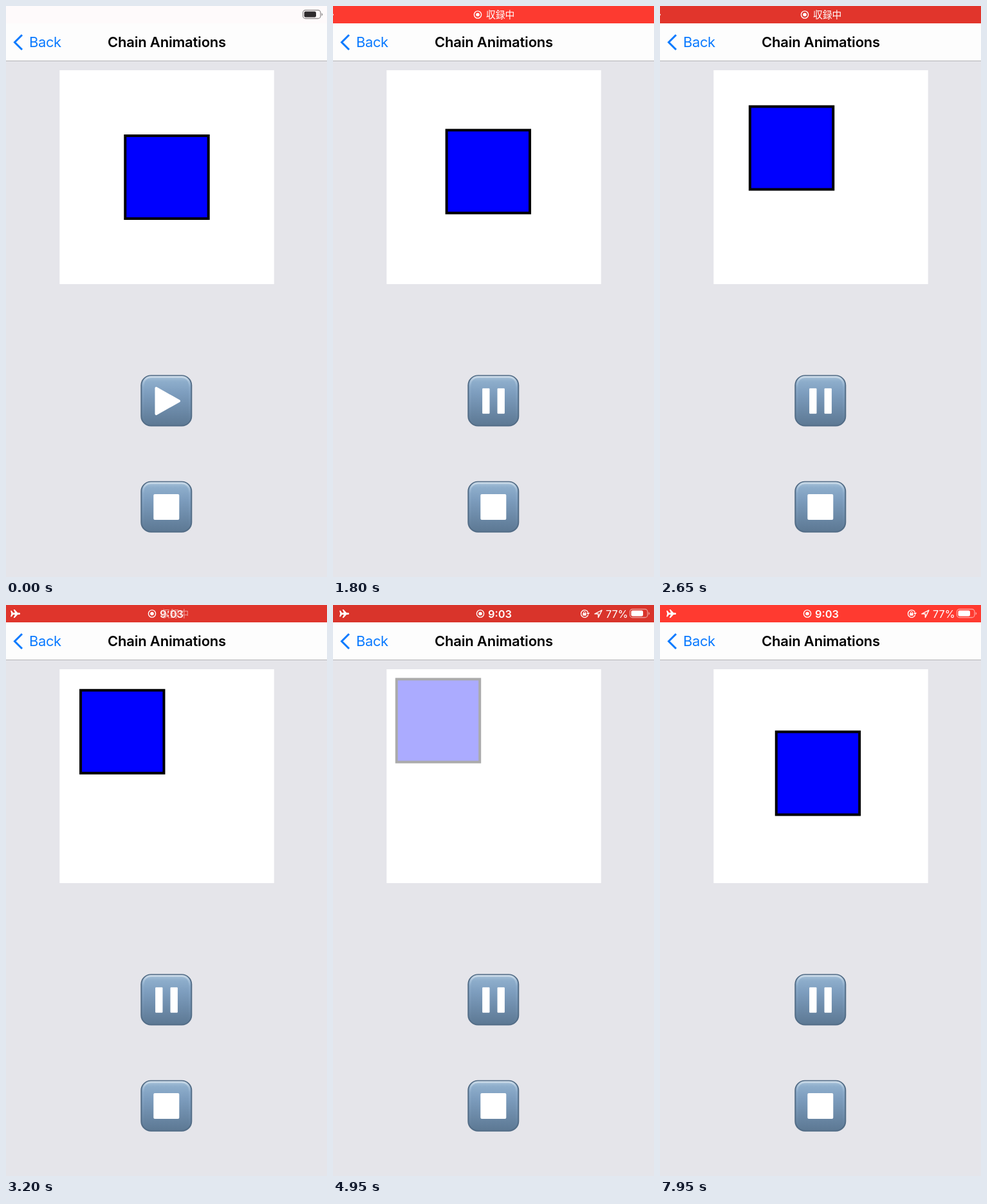
An HTML page for the animation above (8000 ms loop, 499x889 px).

```html
<!DOCTYPE html>
<html lang="en">
<head>
<meta charset="utf-8">
<title>Chain Animations</title>
<style>
  html, body { margin: 0; width: 100%; height: 100%; overflow: hidden; background: #e5e5ea; }
  svg { display: block; width: 499px; height: 889px; font-family: Inter, Roboto, sans-serif; }
  .line { fill: none; stroke: #fff; stroke-width: 1.4; }
</style>
</head>
<body>
<svg viewBox="0 0 499 889">
  <defs>
    <linearGradient id="face" x2="0" y2="1">
      <stop offset="0" stop-color="#a9c3da"/>
      <stop offset=".12" stop-color="#8dadcb"/>
      <stop offset=".35" stop-color="#7d9dbe"/>
      <stop offset="1" stop-color="#5c7893"/>
    </linearGradient>
    <linearGradient id="gloss" x2="0" y2="1">
      <stop offset="0" stop-color="#d5e2ed" stop-opacity=".75"/>
      <stop offset=".22" stop-color="#a9c4de" stop-opacity=".15"/>
      <stop offset="1" stop-color="#a9c4de" stop-opacity="0"/>
    </linearGradient>
    <g id="key">
      <rect x="1" y="1" width="78" height="78" rx="15" fill="url(#face)" stroke="#536d87" stroke-width="2"/>
      <rect x="4" y="3" width="72" height="73" rx="12" fill="none" stroke="url(#gloss)" stroke-width="3"/>
    </g>
    <g id="battery">
      <rect x="461.5" y="6.5" width="27.5" height="13" rx="4" fill="none" stroke="currentColor" stroke-opacity=".5" stroke-width="1.3"/>
      <rect x="463.5" y="8.5" width="18.5" height="9" rx="2.2" fill="currentColor"/>
      <path d="M490.6 11v4.4q1.6-.6 1.6-2.2t-1.6-2.2" fill="currentColor" fill-opacity=".55"/>
    </g>
  </defs>

  <rect width="499" height="889" fill="#e5e5ea"/>

  <rect id="bar" width="499" height="27"/>
  <path id="plane" fill="#fff" d="M10 8.8h1.7l2.2 3.3h3L14.6 7h1.8l4.6 5.1h2.4q1.7.3 1.7 1.4t-1.7 1.4H21L16.4 20h-1.8l2.3-5.1h-3l-2.2 3.3H10l1.2-4.7z"/>
  <g id="middle" fill="#fff">
    <circle class="line" cx="229" cy="13.5" r="5.6"/>
    <circle cx="229" cy="13.5" r="2.8"/>
    <text id="recording" lang="ja" x="242" y="19" font-size="14.8" font-weight="300" font-family="'Noto Sans CJK JP', 'Noto Sans CJK', sans-serif">収録中</text>
    <text id="time" x="241" y="19.5" font-size="16.4" font-weight="600"></text>
  </g>
  <g id="right" color="#fff" fill="#fff">
    <path class="line" d="M396.5 11.5A5.7 5.7 0 1 0 396.6 15.5"/>
    <path d="M394 12h5.2l-2.6 3.2z"/>
    <rect x="388.3" y="12.6" width="5.4" height="4" rx=".6"/>
    <path class="line" d="M389.5 13v-1.4a1.5 1.5 0 0 1 3 0V13" style="stroke-width:1"/>
    <path class="line" d="M406.8 13.8L418 8.2l-5.6 11.2v-5.6z" stroke-linejoin="round"/>
    <text x="424" y="19.5" font-size="16.3">77%</text>
    <use href="#battery"/>
  </g>
  <g id="light">
    <rect width="499" height="27" fill="#fefafb"/>
    <use href="#battery" color="#2e2b2d"/>
  </g>

  <rect y="27" width="499" height="58" fill="#fdfdfd"/>
  <rect y="85" width="499" height="1" fill="#b3b3b6"/>
  <path d="M25 45L13.5 56.5 25 68" fill="none" stroke="#0a7aff" stroke-width="3"/>
  <text x="36" y="64" font-size="22" letter-spacing="-.4" fill="#0a7aff">Back</text>
  <text x="250" y="64" font-size="22" font-weight="600" letter-spacing="-.2" text-anchor="middle">Chain Animations</text>

  <rect x="83.3" y="100" width="333.4" height="333" fill="#fff"/>
  <g id="box">
    <rect x="183.3" y="200" width="133.4" height="133"/>
    <rect x="187.3" y="204" width="125.4" height="125" fill="#00f"/>
  </g>

  <use href="#key" x="209.3" y="574.5"/>
  <path id="play" d="M233.5 595v40l35.5-20z" fill="#fff" stroke="#fff" stroke-width="4" stroke-linejoin="round"/>
  <path id="pause" d="M233.3 596.5h9v37h-9zM256.7 596.5h9v37h-9z" fill="#fff" stroke="#fff" stroke-width="2.4" stroke-linejoin="round"/>
  <use href="#key" x="209.3" y="739.7"/>
  <rect x="229.3" y="760" width="40" height="40" rx="2" fill="#fff"/>
</svg>
<script>
  const LOOP = 8000, STAGE = 2000, TRAVEL = 86.5;
  const FIRST_TAP = 1600, FINISH = FIRST_TAP + 2 * STAGE, RESET = 6000, SECOND_TAP = 7846;
  const el = id => document.getElementById(id);
  const ramp = (t, from, to) => Math.min(1, Math.max(0, (t - from) / (to - from)));
  const show = (id, opacity) => el(id).setAttribute('opacity', opacity);
  const move = (id, x, y = 0) => el(id).setAttribute('transform', `translate(${x} ${y})`);

  function drawStatus(t) {
    // The bar breathes between bright and dark red every two seconds.
    const dark = (1 - Math.cos((t - 1950) / 1000 * Math.PI)) / 2;
    el('bar').setAttribute('fill', `rgb(${255 - 38 * dark},${58 - 6 * dark},${48 - 5 * dark})`);
    show('light', 1 - ramp(t, 30, 375));

    const leaving = 1 - ramp(t, 430, 640);
    const clock = leaving + ramp(t, 3080, 3320);
    move('plane', -24 * (1 - clock) ** 3);
    move('middle', 4 * (clock - 1));
    show('recording', 1 - clock);
    show('time', Math.min(1, 1.8 * clock));
    show('right', leaving + ramp(t, 3300, 3450));
    el('time').textContent = t < 2000 ? '9:02' : '9:03';
  }

  function drawBox(t) {
    const start = t < RESET ? FIRST_TAP : SECOND_TAP;
    const offset = -TRAVEL * ramp(t, start, start + STAGE);
    move('box', offset, offset);
    show('box', 1 - ramp(t, start + STAGE, start + 2 * STAGE));

    const running = t >= FIRST_TAP && t < FINISH || t >= SECOND_TAP;
    show('play', running ? 0 : 1);
    show('pause', running ? 1 : 0);
  }

  function frame() {
    const t = performance.now() % LOOP;
    drawStatus(t);
    drawBox(t);
    requestAnimationFrame(frame);
  }
  frame();
</script>
</body>
</html>
```
